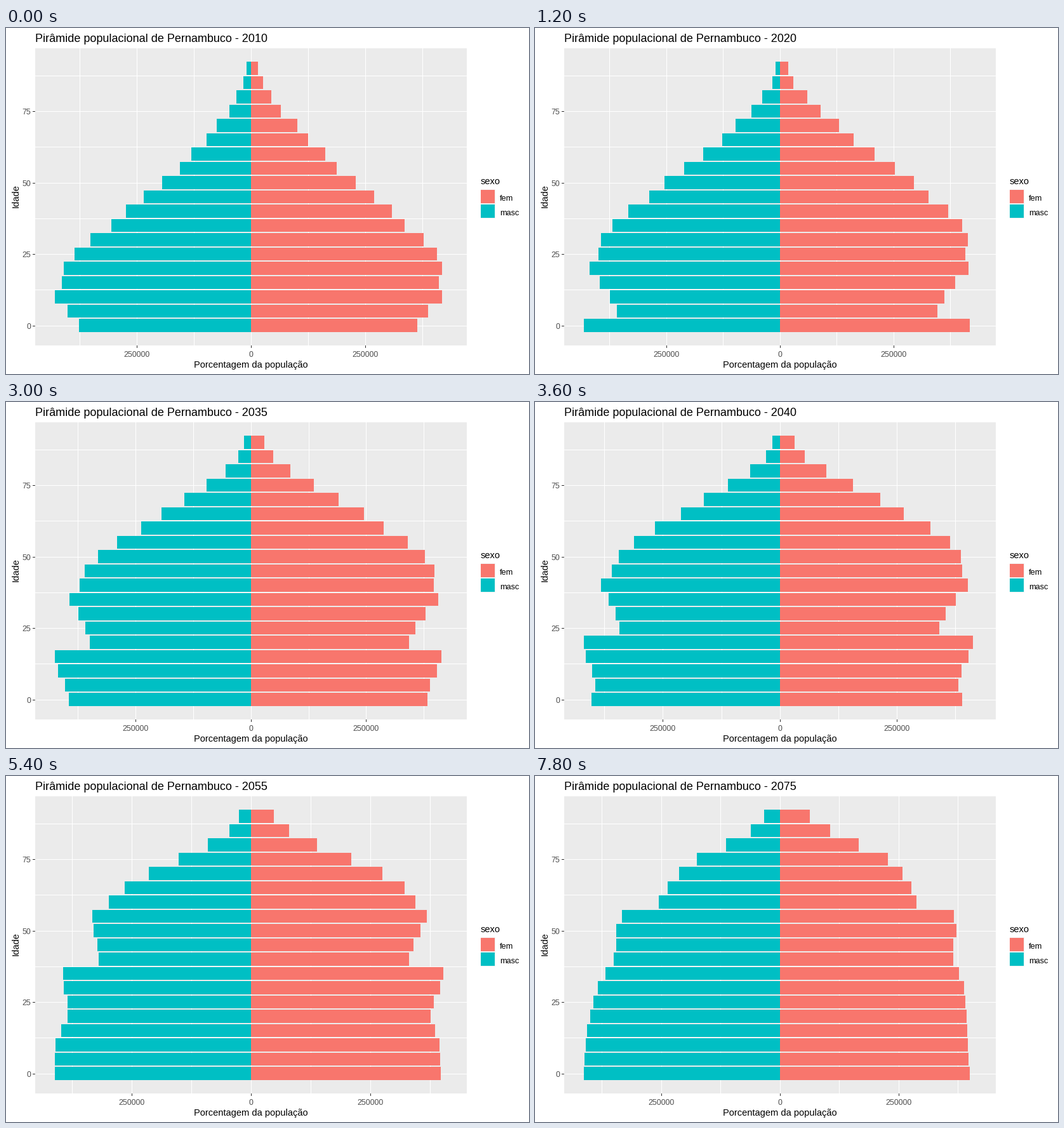
A matplotlib script that plays this animation: 824x545 px, repeating every 8000 ms.

```python
import math

import matplotlib.pyplot as plt
import numpy as np
from matplotlib.animation import FuncAnimation
from matplotlib.patches import Rectangle

W, H, DPI = 824, 545, 100
LEFT, TOP, RIGHT, BOTTOM = 46, 32, 726, 500
MID = 385.8
HALF = (RIGHT - LEFT) / 2 / 1.1       # length of the longest bar
UNIT = (BOTTOM - TOP) / (94.5 * 1.1)  # pixels per year of age
FEM, MASC = "#F8766D", "#00BFC4"
GREY, TICK, LABEL = "#EBEBEB", "#333333", "#4D4D4D"

# Boys born per five years, in thousands: turning points of the curve
BIRTHS = {1925: 115, 1935: 117, 1940: 142, 1945: 154.5, 1950: 184, 1955: 201.5,
          1970: 309, 1975: 335, 1980: 376, 1985: 404.5, 1990: 421, 1995: 419,
          2000: 431.3, 2005: 401.5, 2010: 376, 2015: 359, 2020: 431.4, 2025: 420,
          2030: 403, 2035: 395, 2045: 411, 2065: 411, 2075: 413}
# Girls per boy, by year of birth
GIRLS = {1925: 0.93, 1940: 1.075, 1970: 1.047, 1985: 1.024, 2002: 0.968}
GROUPS = np.arange(19)  # five-year age groups, the last one open


def curve(points, x):
    return np.interp(x, list(points), list(points.values()))


def survival(level, onset, start, growth):
    """Share alive per age group: early rise in risk plus Gompertz ageing."""
    g = GROUPS[:-1]
    risk = level / (1 + np.exp(1.5 * (onset - g))) + start * growth ** g
    return np.exp(-np.concatenate([[0], np.cumsum(risk)]))


ALIVE_MEN = survival(0.0165, 2.1, 0.00054, 1.55)
ALIVE_WOMEN = survival(0.0023, -3, 0.00052, 1.53)


def population(year):
    """Men and women per age group, in thousands."""
    born = year - 5 * GROUPS
    boys = curve(BIRTHS, born)
    men = boys * ALIVE_MEN
    women = boys * curve(GIRLS, born) * ALIVE_WOMEN
    men[-1], women[-1] = 0.55 * men[-2], 0.6 * women[-2]
    return men, women


def px(v):
    return int(math.floor(v + 0.5))


def age_y(age):
    return BOTTOM + 0.02 - (age + 2.25 + 4.725) * UNIT


fig = plt.figure(figsize=(W / DPI, H / DPI), dpi=DPI, facecolor="white")
ax = fig.add_axes([0, 0, 1, 1])
ax.set_xlim(0, W)
ax.set_ylim(H, 0)
ax.axis("off")


def box(x0, y0, x1, y1, color, z=1):
    return ax.add_patch(Rectangle((x0, y0), x1 - x0, y1 - y0, facecolor=color,
                                  linewidth=0, antialiased=False, zorder=z))


def text(x, y, s, size, color="black", ha="left", **kw):
    return ax.text(x, y, s, fontsize=size * 72 / DPI, color=color, ha=ha,
                   va="baseline", family="Liberation Sans", zorder=5, **kw)


# panel, horizontal grid and age axis
box(LEFT, TOP, RIGHT, BOTTOM, GREY, 0)
for k in range(8):
    age = 12.5 * k
    row = px(age_y(age))
    box(LEFT, row, RIGHT, row + 1, "white")
    if k % 2 == 0:
        box(LEFT - 4, row, LEFT, row + 1, TICK)
        text(39.5, row + 5.3, f"{age:.0f}", 12.4, LABEL, "right")

# vertical grid and population axis, in steps of 125 thousand
columns = []
for k in range(-3, 4):
    line = box(0, TOP, 1, BOTTOM, "white")
    tick = label = None
    if k % 2 == 0:
        tick = box(0, BOTTOM, 1, BOTTOM + 4, TICK)
        label = text(MID, 518, str(abs(k) * 125000), 12.4, LABEL, "center")
    columns.append((k, line, tick, label))

centre = px(MID)
bars = []
for g in GROUPS:
    y0, y1 = px(age_y(5 * g + 2.25)), px(age_y(5 * g - 2.25))
    bars.append((box(centre, y0, centre, y1, MASC, 3),
                 box(centre, y0, centre, y1, FEM, 3)))

title = text(LEFT, 22, "", 18)
text(385.5, 535, "Porcentagem da população", 14.67, ha="center")
text(20, 264.5, "Idade", 14.67, ha="center", rotation=90, rotation_mode="anchor")

# legend
text(748, 246, "sexo", 14.67)
for top, color, name in ((254, FEM, "fem"), (277, MASC, "masc")):
    box(748, top, 771, top + 23, "#F2F2F2")
    box(748, top + 1, 770, top + 22, color, 2)
    text(778, top + 18, name, 12.7)


def draw(i):
    year = 2010 + 5 * (i // 3)
    men, women = population(year)
    scale = HALF / max(men.max(), women.max())
    title.set_text(f"Pirâmide populacional de Pernambuco - {year}")
    for (left, right), m, w in zip(bars, men, women):
        x = px(MID - m * scale)
        left.set_x(x)
        left.set_width(centre - x)
        right.set_width(px(MID + w * scale) - centre)
    for k, line, tick, label in columns:
        x = MID + k * 125 * scale
        line.set_x(px(x))
        if tick:
            tick.set_x(px(x))
            label.set_x(x)
    return []


anim = FuncAnimation(fig, draw, frames=40, interval=200, init_func=lambda: draw(0),
                     repeat=True, repeat_delay=0, blit=False)
plt.show()
```
